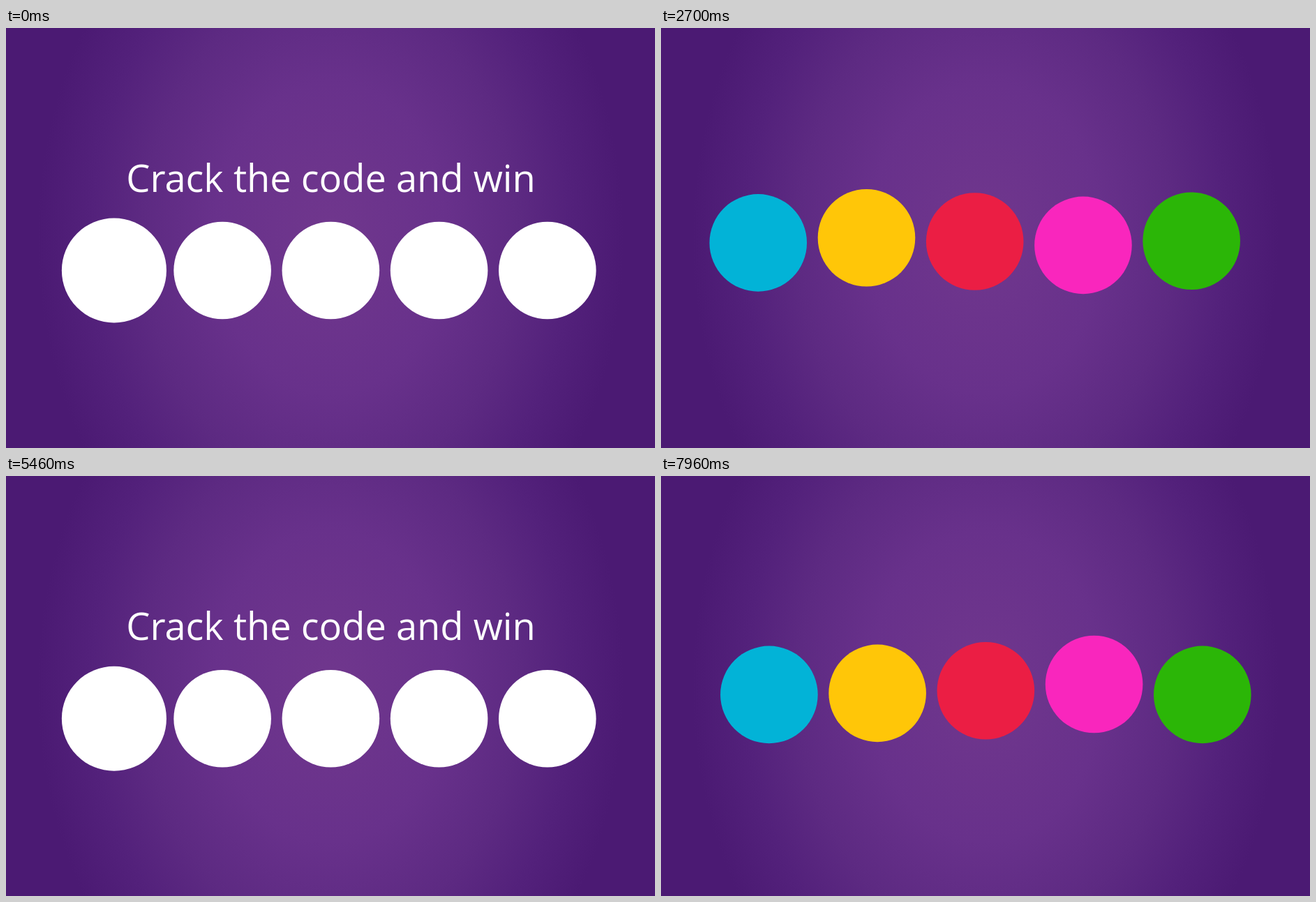
An HTML page for the animation above (8000 ms loop, 930x602 px).

```html
<!DOCTYPE html>
<html lang="en">
<head>
<meta charset="utf-8">
<title>Crack the code</title>
<style>
  html, body { margin: 0; width: 100%; height: 100%; overflow: hidden; }
  body { background: radial-gradient(420px 560px at 465px 301px, #70378d, #68318b 40%, #5d2a82 64%, #53217b 82%, #4b1a73); }
  svg { display: block; width: 930px; height: 602px; }
  text { font-family: "Open Sans", "Noto Sans", sans-serif; text-anchor: middle; fill: #fff; }
  .title { font-size: 54.2px; }
  .win { font-size: 45.85px; }
  .cell text { font-size: 65px; font-weight: 300; fill: #000; }
</style>
</head>
<body>
<svg viewBox="0 0 930 602">
  <g id="form"><text class="title" x="465.5" y="235">Crack the code and win</text></g>
  <g id="loader"></g>
  <g id="win" class="win">
    <text x="465.5" y="286">Congratulations, you cracked the</text>
    <text x="466" y="343">code!</text>
  </g>
</svg>
<script>
const W = 930, H = 602, LOOP = 8000, SLIDE = 400, FOCUS = 100;
const COLORS = ['#02b3d7', '#ffc608', '#eb1e44', '#f926bd', '#2bb607'];
const ROUNDS = [
  { start: -1000, code: 'abcde', typed: [30, 360, 430, 800, 1060], send: 1082 },
  { start: 5067, code: 'qkgmd', typed: [6000, 6165, 6360, 6830, 6980], send: 6993 }
];
const RESULT = 2664;

const $ = id => document.getElementById(id);
const clamp = v => Math.min(1, Math.max(0, v));
const cellX = i => 154.9 + 155.23 * i;

function add(parent, tag, attrs = {}) {
  const el = document.createElementNS('http://www.w3.org/2000/svg', tag);
  for (const name in attrs) el.setAttribute(name, attrs[name]);
  return parent.appendChild(el);
}

function move(el, x, y, scale = 1) {
  el.setAttribute('transform', `translate(${x} ${y}) scale(${scale})`);
}

// CSS-style cubic-bezier easing
function bezier(x1, y1, x2, y2) {
  const curve = (a, b, s) => 3 * (1 - s) ** 2 * s * a + 3 * (1 - s) * s * s * b + s ** 3;
  return p => {
    if (p <= 0 || p >= 1) return clamp(p);
    let lo = 0, hi = 1;
    for (let n = 0; n < 24; n++) {
      const mid = (lo + hi) / 2;
      if (curve(x1, x2, mid) < p) lo = mid; else hi = mid;
    }
    return curve(y1, y2, lo);
  };
}
const inOut = bezier(.42, 0, .58, 1);
const ease = bezier(.25, .1, .25, 1);
const rise = bezier(.215, .61, .355, 1);
const fall = bezier(.755, .05, .855, .06);

const slide = (t, start) => inOut((t - start) / SLIDE);

// Three shrinking hops per period
const HOP_AT = [0, .2, .4, .43, .53, .7, .8, .9, 1];
const HOP_Y = [0, 0, 16.5, 16.5, 0, 8.2, 0, 2.2, 0];
const PERIOD = 1000, STAGGER = 275, LEAD = 165;

function hop(ms) {
  if (ms <= 0) return 0;
  const p = ms % PERIOD / PERIOD;
  const k = HOP_AT.findIndex(at => at > p);
  const from = HOP_Y[k - 1], to = HOP_Y[k];
  const q = (p - HOP_AT[k - 1]) / (HOP_AT[k] - HOP_AT[k - 1]);
  return from + (to - from) * (to > from ? rise : fall)(q);
}

const cells = COLORS.map(() => {
  const g = add($('form'), 'g', { class: 'cell' });
  add(g, 'circle', { r: 69.8, fill: '#fff' });
  return { g, label: add(g, 'text', { y: 17.5 }) };
});
const balls = COLORS.map(fill => add($('loader'), 'circle', { r: 69.8, fill }));

function drawForm(t, { start, code, typed, send }) {
  move($('form'), -W * slide(t, send), H * (1 - slide(t, start)));
  cells.forEach(({ g, label }, i) => {
    const grow = i ? ease((t - typed[i - 1]) / FOCUS) : 1;
    const shrink = i < 4 ? ease((t - typed[i]) / FOCUS) : 0;
    move(g, cellX(i), 347.5, 1 + .075 * (grow - shrink));
    g.setAttribute('opacity', t >= typed[4] ? .75 : 1);
    label.textContent = t >= typed[i] ? code[i] : '';
  });
}

function drawLoader(t, { send }) {
  const leave = send < RESULT ? slide(t, RESULT) : 0;
  move($('loader'), W * (1 - slide(t, send) - leave), 0);
  balls.forEach((ball, i) => move(ball, cellX(i), 313.4 - hop(t - send + LEAD - STAGGER * i)));
}

function frame(now) {
  const t = now % LOOP;
  const round = ROUNDS[t < ROUNDS[1].start ? 0 : 1];
  drawForm(t, round);
  drawLoader(t, round);
  move($('win'), W * (1 - slide(t, RESULT)), -H * slide(t, ROUNDS[1].start));
  requestAnimationFrame(frame);
}
frame(0);
</script>
</body>
</html>
```
